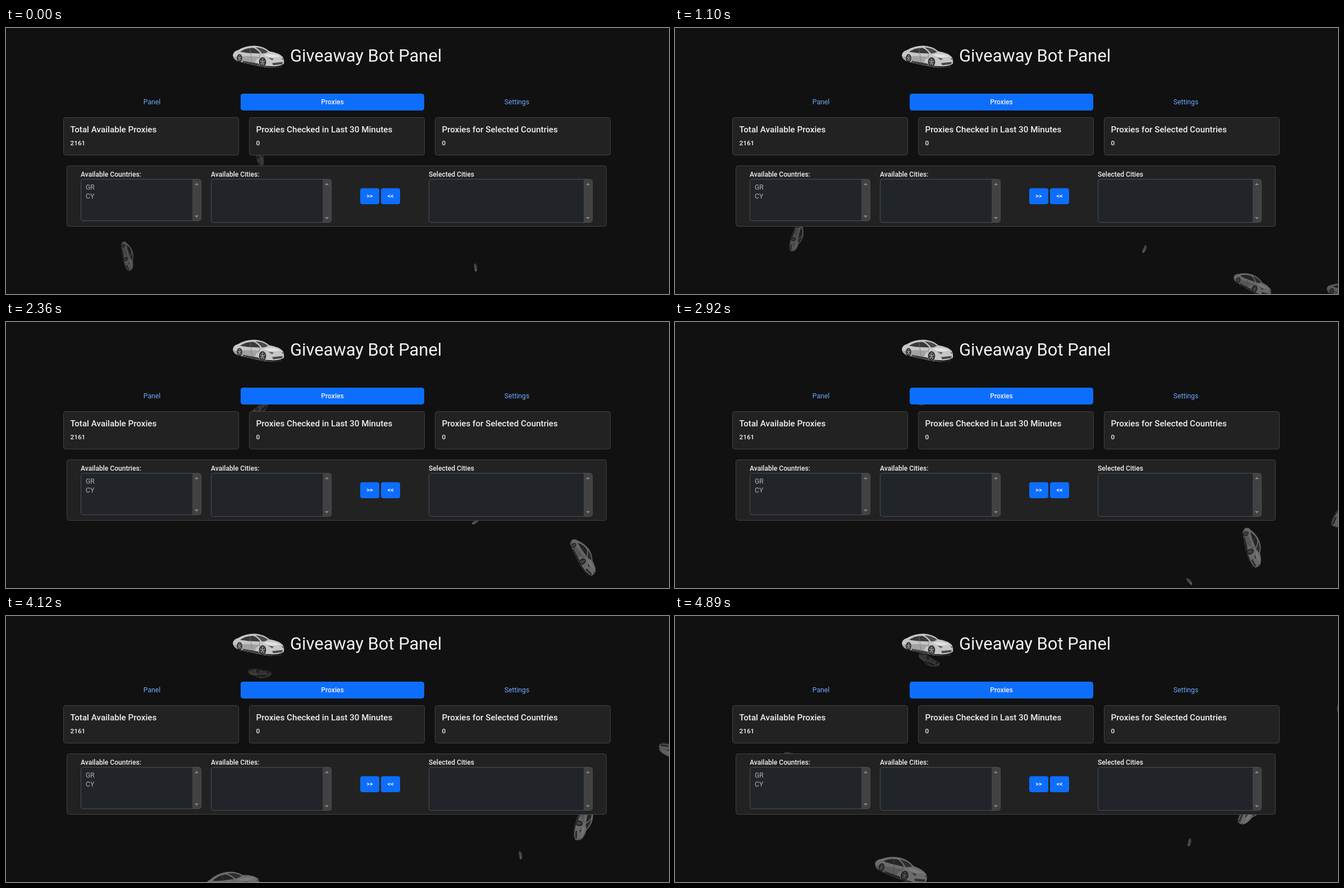
These frames come from a looping animation (1181 px wide and 474 px high, 4960 ms). An HTML page:

```html
<!DOCTYPE html>
<html lang="en">
<head>
<meta charset="utf-8">
<title>Giveaway Bot Panel</title>
<style>
  html, body { margin: 0; width: 100%; height: 100%; overflow: hidden; background: #111; }
  svg { display: block; width: 1181px; height: 474px; font: 12.2px Roboto, sans-serif; fill: #f0f0f0; }
  .title { font-size: 30.9px; }
  .head { font-size: 15.2px; font-weight: 500; }
  .num { font-size: 11.8px; font-weight: 500; }
  .label { font-weight: 500; font-size: 12.1px; }
  .link { fill: #6ea8fe; }
  .option { fill: #adb0b3; }
  .mid { text-anchor: middle; }
  .card { fill: #222; stroke: #434343; }
  .list { fill: #212529; stroke: #495057; }
  .blue { fill: #0d6efd; }
  .arrow { font-size: 11px; font-weight: 700; }
</style>
</head>
<body>
<svg viewBox="0 0 1181 474">
  <defs>
    <g id="wheel">
      <ellipse rx="6.3" ry="8.3" fill="#1c1c1c"/>
      <ellipse rx="4.6" ry="6.4" fill="#8d8d8d"/>
      <ellipse rx="2.9" ry="4.2" fill="none" stroke="#2b2b2b" stroke-width="2.4" stroke-dasharray="2.4 2"/>
    </g>
    <g id="car">
      <path d="M-41 9L14 19Q36 21 46 17L40 19Q24 21 10 19Z" fill="#ddd"/>
      <path d="M-46 -2Q-45 -9 -37 -11Q-24 -19 -7 -19Q9 -18 19 -9Q37 -6 43 1Q46 6 45 13Q41 17 28 18L10 17L-36 9Q-45 6 -46 -2Z" fill="#c6c6c6"/>
      <path d="M-45 1Q-20 -2 3 1Q-8 6 -6 14L-36 9Q-44 6 -45 1Z" fill="#a2a2a2"/>
      <path d="M-28 8L0 13L1 16L-28 10Z" fill="#3a3a3a"/>
      <path d="M-33 -8Q-22 -16 -9 -15Q-2 -12 3 -5L-19 -6Z" fill="#383838"/>
      <path d="M-6 -16Q8 -16 17 -8Q12 -5 6 -5Q1 -12 -6 -16Z" fill="#4b4b4b"/>
      <path d="M-16 -15L-14 -6L-12 10M2 -4L1 4" fill="none" stroke="#777" stroke-width=".8"/>
      <path d="M8 -3Q24 -6 39 0Q28 2 20 2Z" fill="#e2e2e2"/>
      <path d="M17 2L27 4L24 7ZM40 3L44 4L44 7Z" fill="#555"/>
      <path d="M24 12L43 10L42 14L26 16Z" fill="#4a4a4a"/>
      <use href="#wheel" transform="translate(7 10)"/>
      <use href="#wheel" transform="translate(-34 3) scale(.75 .85)"/>
    </g>
  </defs>
  <rect width="1181" height="474" fill="#111"/>
  <g id="sky"></g>
  <use href="#car" x="450" y="50.5"/>
  <text class="title" x="506" y="59.5">Giveaway Bot Panel</text>
  <rect class="blue" x="418" y="117" width="327" height="30" rx="4.5"/>
  <g class="mid">
    <text class="link" x="260" y="136">Panel</text>
    <text x="581.5" y="136" class="label">Proxies</text>
    <text class="link" x="910" y="136">Settings</text>
  </g>
  <g id="ui"></g>
</svg>
<script>
const LOOP = 4960;
const $ = id => document.getElementById(id);

// Static panels
const box = (cls, x, y, w, h) =>
  `<rect class="${cls}" x="${x + .5}" y="${y + .5}" width="${w - 1}" height="${h - 1}" rx="4"/>`;
const text = (cls, x, y, s) => `<text class="${cls}" x="${x}" y="${y}">${s}</text>`;

const card = (x, head, num) =>
  box('card', x, 159, 313, 68) + text('head', x + 12.5, 185.5, head) + text('num', x + 12.5, 208.5, num);

function list(x, w, h, label, options = []) {
  const right = x + w - 1, bottom = 269 + h, mid = right - 7.5;
  return text('label', x, 264.5, label) + box('list', x, 269, w, h) +
    `<path fill="#424242" d="M${right - 15} 270H${right - 3}q3 0 3 3V${bottom - 4}q0 3 -3 3H${right - 15}Z"/>` +
    `<path fill="#868686" d="M${mid - 3.5} 280h7l-3.5 -4ZM${mid - 3.5} ${bottom - 10}h7l-3.5 4Z"/>` +
    options.map((s, i) => text('option', x + 9, 287.5 + 16 * i, s)).join('');
}

const button = (x, s) =>
  `<rect class="blue" x="${x}" y="285.5" width="34" height="28.5" rx="4"/>` + text('arrow mid', x + 17, 302.5, s);

$('ui').innerHTML =
  card(102, 'Total Available Proxies', '2161') +
  card(433, 'Proxies Checked in Last 30 Minutes', '0') +
  card(764, 'Proxies for Selected Countries', '0') +
  box('card', 108, 245, 962, 109) +
  list(133, 215, 75, 'Available Countries:', ['GR', 'CY']) +
  list(365, 215, 78, 'Available Cities:') +
  button(631, '&gt;&gt;') + button(668, '&lt;&lt;') +
  list(753, 292, 78, 'Selected Cities');

// Drifting cars: start position, scale, opacity, start angle, rise per ms, turn per ms
const cars = [
  [217, 406, .575, .36, 70],
  [1029.5, 488.6, .79, .48, -11],
  [452, 226, .45, .22, 70],
  [836.5, 427, .16, .42, 75],
  [916.5, 550, .16, .42, -35],
  [403.5, 598, 1.05, .5, -119.5],
  [1197, 553.8, .8, .4, -56, .0744, .0605],
].map(([x, y, scale, opacity, angle, rise = .03, turn = .0265]) => {
  const node = document.createElementNS('http://www.w3.org/2000/svg', 'use');
  node.setAttribute('href', '#car');
  node.setAttribute('opacity', opacity);
  $('sky').append(node);
  return t => node.setAttribute('transform',
    `translate(${x} ${y - rise * t}) rotate(${angle + turn * t}) scale(${scale})`);
});

const start = performance.now();
function draw() {
  const t = (performance.now() - start) % LOOP;
  cars.forEach(move => move(t));
  requestAnimationFrame(draw);
}
draw();
</script>
</body>
</html>
```
